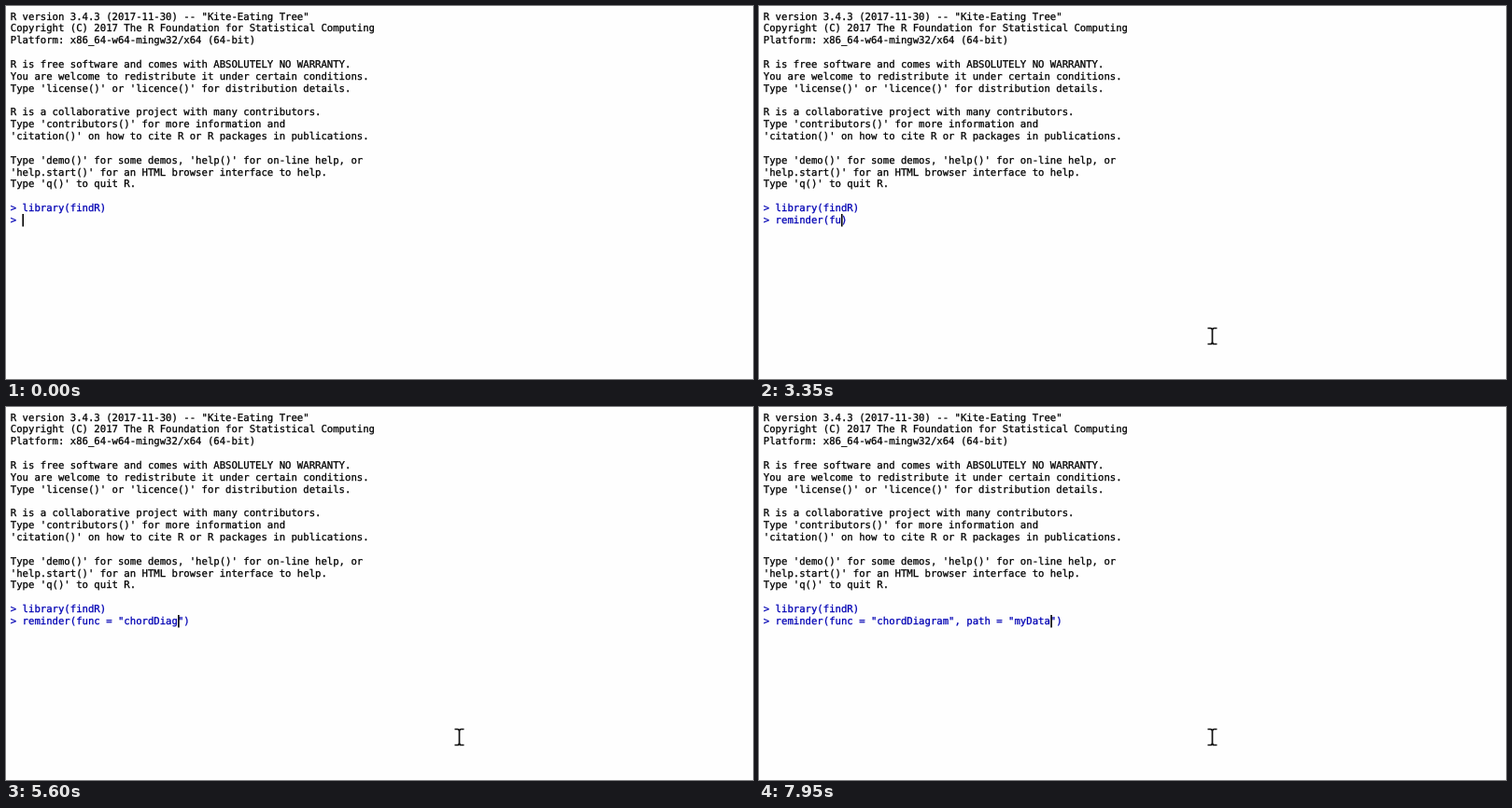
Animation, 800 px wide and 400 px high, one loop 8000 ms. Source, as an HTML page:

```html
<!DOCTYPE html>
<html lang="en">
<head>
<meta charset="utf-8">
<title>R console</title>
<style>
  html, body { margin: 0; width: 100%; height: 100%; overflow: hidden; background: #fefefe; }
  svg { display: block; }
  text {
    font: 10.645px "DejaVu Sans Mono", monospace;
    white-space: pre;
    text-rendering: geometricPrecision;
    fill: var(--ink);
    stroke: var(--ink);
    stroke-width: .28px;
    --ink: #000;
  }
  .input { --ink: #0000b4; }
  .package { --ink: #a0a0a0; }
</style>
</head>
<body>
<svg width="800" height="400" viewBox="0 0 800 400">
  <g id="console"></g>
  <text id="prompt" class="input" x="4.8" y="232.9"></text>
  <rect id="caret" y="223" width="1.6" height="13.5"/>
  <g id="popup"></g>
  <path id="beam" fill="none" stroke="#111" stroke-width="1.7"
    d="M480.5 345.5H483.5Q485.5 345.5 485.5 348V360Q485.5 362.5 483.5 362.5H480.5M490.5 345.5H487.5Q485.5 345.5 485.5 348M485.5 360Q485.5 362.5 487.5 362.5H490.5"/>
</svg>
<script>
const LOOP = 8000, LEFT = 4.8, CHAR = 6.41, LINE = 12.84, ROW = 15.6;
const $ = id => document.getElementById(id);
const escape = s => s.replace(/&/g, "&amp;").replace(/</g, "&lt;");
const text = (x, y, s, cls = "") => `<text x="${x}" y="${y}" class="${cls}">${escape(s)}</text>`;

const banner = `R version 3.4.3 (2017-11-30) -- "Kite-Eating Tree"
Copyright (C) 2017 The R Foundation for Statistical Computing
Platform: x86_64-w64-mingw32/x64 (64-bit)

R is free software and comes with ABSOLUTELY NO WARRANTY.
You are welcome to redistribute it under certain conditions.
Type 'license()' or 'licence()' for distribution details.

R is a collaborative project with many contributors.
Type 'contributors()' for more information and
'citation()' on how to cite R or R packages in publications.

Type 'demo()' for some demos, 'help()' for on-line help, or
'help.start()' for an HTML browser interface to help.
Type 'q()' to quit R.

> library(findR)`;

$("console").innerHTML = banner.split("\n")
  .map((s, i) => text(LEFT, 14.6 + i * LINE, s, s[0] === ">" ? "input" : "")).join("");

// Each step holds the text before and after the caret.
const steps = [{ at: 0, before: "", after: "" }];
function type(start, gap, added, after) {
  let { before } = steps[steps.length - 1];
  [...added].forEach((c, i) => {
    before += c;
    steps.push({ at: start + i * gap, before, after });
  });
}
type(2150, 90, "reminder", "");
type(2870, 0, "(", ")");
type(3150, 130, "func", ")");
type(3950, 0, " = ", ")");
type(4150, 0, '"', '")');
type(4450, 135, "chordDiag", '")');
type(5700, 130, "ram", '")');
type(6080, 100, '", ', ")");
type(6380, 80, "path", ")");
type(7050, 0, " = ", ")");
type(7250, 0, '"', '")');
type(7400, 100, "myData", '")');

const popups = [
  { from: 3600, to: 3950, col: 11, rows: [["func ="], ["function", "{base}"],
    ["functionBody", "{methods}"], ["functionBody<-", "{methods}"]] },
  { from: 6700, to: 7050, col: 34, rows: [["path ="], ["path.expand", "{base}"], ["path.package", "{base}"]] }
];

function drawPopup({ col, rows }) {
  const longest = i => Math.max(...rows.map(r => (r[i] || "").length)) * CHAR;
  const x = LEFT + col * CHAR - 6, nameX = x + 18.8;
  const packageX = nameX + longest(0) + 17;
  const width = packageX + longest(1) + 10.5 - x;
  const box = `<rect x="${x}" y="240.5" width="${width}" height="${rows.length * ROW + 2.5}" fill="#fff" stroke="#c4c4c4"/>
    <rect x="${x + 2}" y="242.5" width="${width - 4}" height="14" fill="#94bfee"/>`;
  return box + rows.map(([name, source = ""], i) => {
    const y = 252.8 + i * ROW, fill = i ? "#6da0d0" : "#b79ad3";
    const icon = `<path transform="translate(${x + 10} ${y - 1.5})" d="M-3.5 1.5L1.5-3.5 4-2.5 3.5.5-1 4Z" fill="${fill}" stroke="#66809f" stroke-width=".7"/>`;
    return icon + text(nameX, y, name) + text(packageX, y, source, "package");
  }).join("");
}
popups.forEach(p => { p.svg = drawPopup(p); });

const hidden = [[200, 450], [700, 950], [1250, 1450], [1750, 1950], [6800, 7050]];
const show = (el, on) => el.setAttribute("visibility", on ? "visible" : "hidden");
let shown;

function frame() {
  const t = performance.now() % LOOP;
  const { before, after } = steps.filter(s => s.at <= t).pop();
  $("prompt").textContent = "> " + before + after;
  $("caret").setAttribute("x", LEFT + (before.length + 2) * CHAR - 0.2);
  show($("caret"), !hidden.some(([a, b]) => t >= a && t < b));
  show($("beam"), t >= 1850);
  const open = popups.find(p => t >= p.from && t < p.to);
  if (open !== shown) {
    $("popup").innerHTML = open ? open.svg : "";
    shown = open;
  }
  requestAnimationFrame(frame);
}
frame();
</script>
</body>
</html>
```
